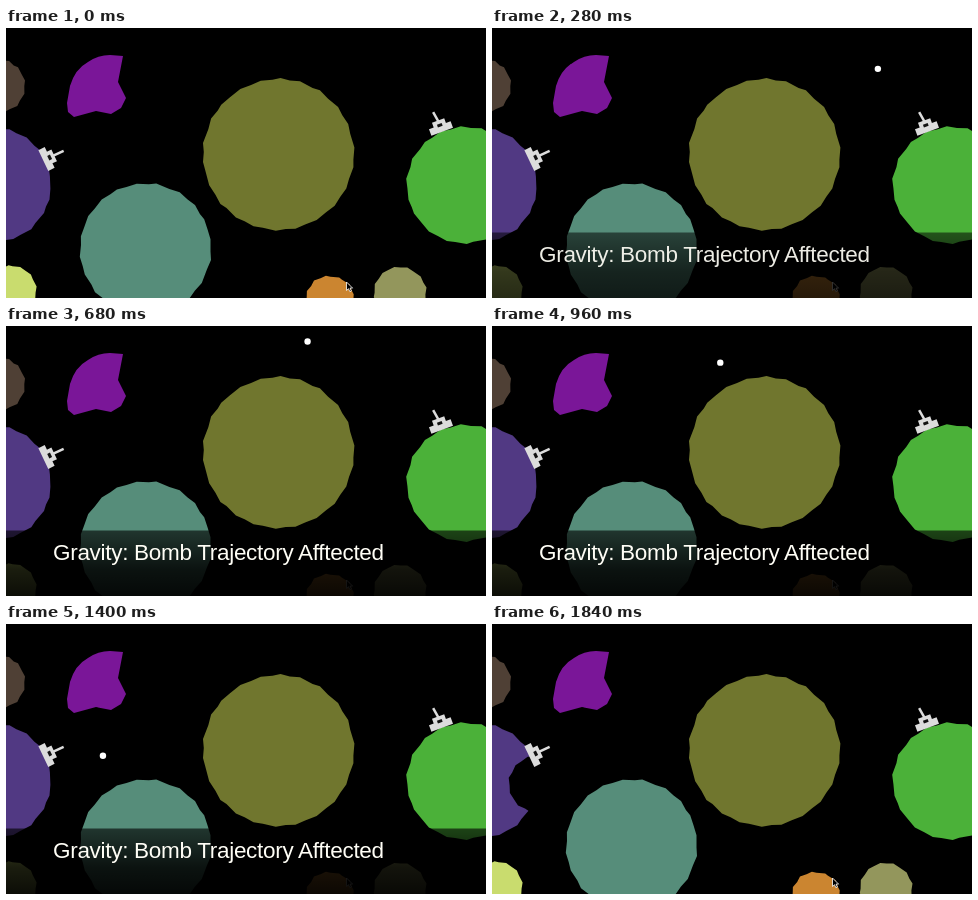
Write an HTML page that moves like this. It is 480x270 px and loops after 1.86 s.

```html
<!DOCTYPE html>
<html lang="en">
<head>
<meta charset="utf-8">
<title>Gravity</title>
<style>
  html, body { margin: 0; width: 100%; height: 100%; overflow: hidden; background: #000; }
  svg { display: block; width: 100vw; height: 100vh; }
  text { font: 22.5px "Liberation Sans", Arial, sans-serif; letter-spacing: -.3px; fill: #fffef6; }
  .tank { fill: #dcdcdc; }
  .barrel { stroke: #dcdcdc; stroke-width: 2.5; }
</style>
</head>
<body>
<svg viewBox="0 0 480 270">
  <defs>
    <linearGradient id="fall" x2="0" y2="1">
      <stop offset="0" stop-opacity=".62"/>
      <stop offset=".6" stop-opacity=".87"/>
      <stop offset="1" stop-opacity=".94"/>
    </linearGradient>
    <g id="hull">
      <path d="M-11.5-3.5h23v7h-23zM-6.5-8.5h13v5h-13z"/>
      <path d="M-2.5-5h5v3h-5z" fill="#111"/>
    </g>
  </defs>
  <g id="planets">
    <path fill="#7a1698" d="M117 28L112 54L120 70L115 80L105 86L90 83L68 89L62 84L61 75L64 58Q69 41 82 34Q92 27 104 27z"/>
  </g>
  <g class="tank" transform="translate(40.5 131) rotate(64.5)">
    <use href="#hull"/><path class="barrel" d="M0-7V-19"/>
  </g>
  <g class="tank" transform="translate(435 100.5) rotate(-20)">
    <use href="#hull"/><path class="barrel" d="M0-7L-1.8-18"/>
  </g>
  <circle id="bomb" r="3.2" fill="#fff"/>
  <path d="M340.5 254v8.5l2-1.8 1.4 3 1.5-.7-1.4-2.9h2.6z" stroke="#fff" stroke-width=".8"/>
  <path id="shade" d="M0 204.5H480V270H0z" fill="url(#fall)"/>
  <text id="caption" x="47" y="233.7">Gravity: Bomb Trajectory Afftected</text>
</svg>
<script>
const LOOP = 1860, FIRE = 50, HIT = 1550;
const byId = id => document.getElementById(id);

let seed = 7;
function random() {
  seed = (seed * 16807) % 2147483647;
  return seed / 2147483647;
}

// A disc with a jagged rim
function addPlanet(fill, cx, cy, radius) {
  const count = Math.round(radius * 0.4 + 14);
  const points = Array.from({ length: count }, (_, i) => {
    const angle = (i + random() * 0.5) / count * 2 * Math.PI;
    const r = radius + (i % 2 ? 1 : -0.6) * (0.4 + random() * 0.8);
    return [cx + r * Math.cos(angle), cy + r * Math.sin(angle)].map(n => n.toFixed(1)).join();
  });
  const el = document.createElementNS("http://www.w3.org/2000/svg", "polygon");
  el.setAttribute("fill", fill);
  el.setAttribute("points", points.join(" "));
  byId("planets").append(el);
  return el;
}

addPlanet("#4f4035", -7, 58, 26);
addPlanet("#70762e", 272.5, 126.5, 75.3);
addPlanet("#568d7a", 139.5, 221, 65.3);
addPlanet("#4bb139", 459, 157, 58);
addPlanet("#c9dc6e", 6, 262, 24);
addPlanet("#cb8530", 324, 272, 24);
addPlanet("#93965c", 394, 265, 26);
addPlanet("#513983", -12, 157, 56.8);
const crater = addPlanet("#000", 45, 160, 28);

const ramp = (t, from, to) => Math.min(1, Math.max(0, (t - from) / (to - from)));
const cubic = (u, a, b, c, d) => a + u * (b + u * (c + u * d));
const show = (el, on) => el.setAttribute("visibility", on ? "visible" : "hidden");

function draw(t) {
  // Seconds from just after the top of the arc
  const u = (t - 680) / 1000;
  const bomb = byId("bomb");
  bomb.setAttribute("cx", cubic(u, 301.8, -243, -72.4, 21.3));
  bomb.setAttribute("cy", cubic(u, 15.5, 18.7, 203.1, -7.4));
  show(bomb, t >= FIRE && t < HIT);
  show(crater, t >= HIT);

  const fade = ramp(t, 40, 300) * (1 - ramp(t, 1610, 1830));
  byId("caption").setAttribute("opacity", fade);
  byId("shade").setAttribute("opacity", fade * fade);
}

const start = performance.now();
function tick() {
  draw((performance.now() - start) % LOOP);
  requestAnimationFrame(tick);
}
tick();
</script>
</body>
</html>
```
